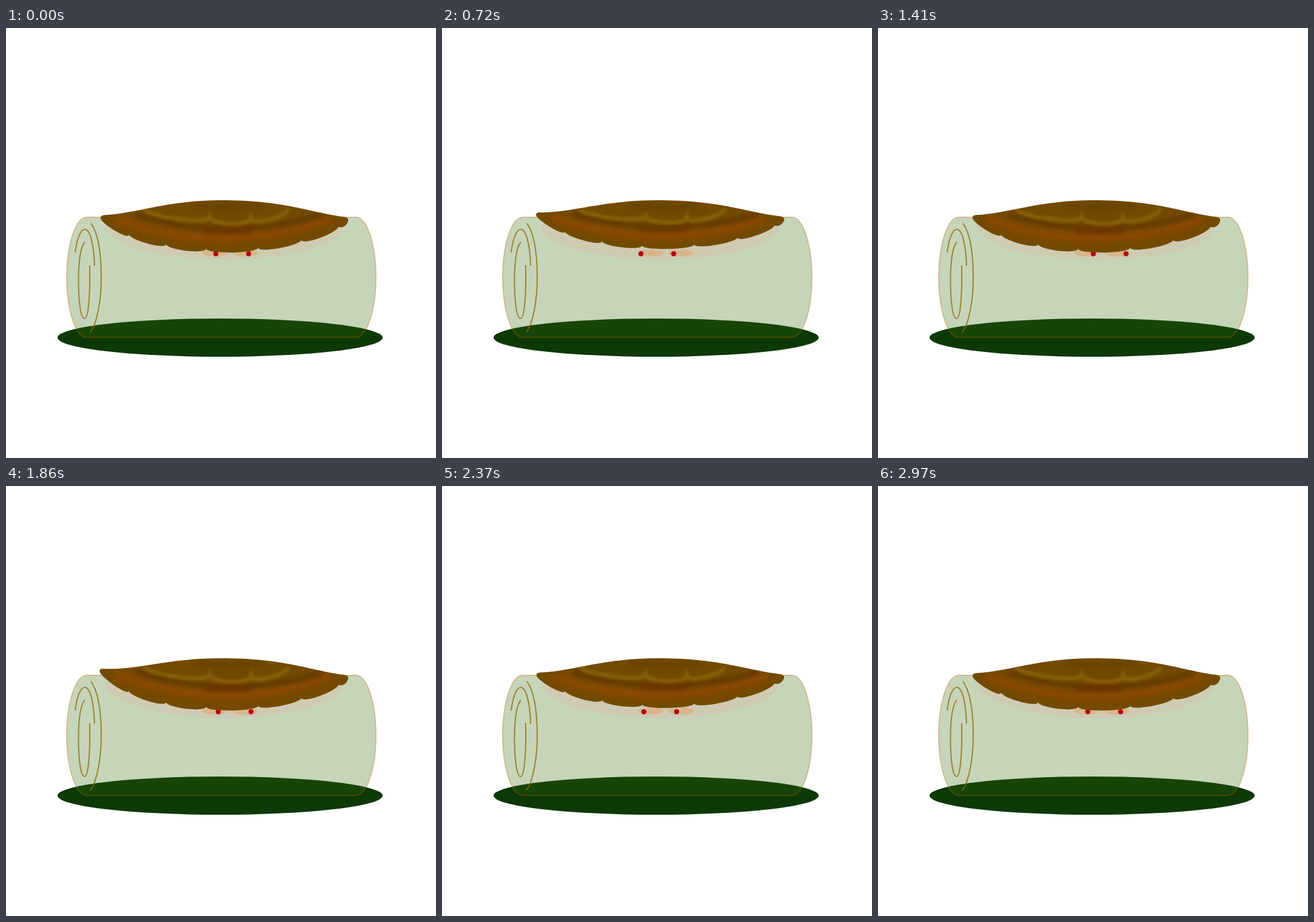
Recreate the animation shown at these times as an HTML page with a canvas. Size 709 px wide and 709 px high, loop 3 s.

```html
<!DOCTYPE html>
<html>
<head>
<meta charset="utf-8">
<style>
html, body { margin: 0; width: 100%; height: 100%; overflow: hidden; background: #fff; }
canvas { display: block; }
</style>
</head>
<body>
<canvas id="stage" width="709" height="709"></canvas>
<script>
const ctx = document.getElementById('stage').getContext('2d');
const LOOP = 3000, STEP = 30, { PI } = Math;

// Left pupil position at a few times
const GLANCES = [[0, 346], [720, 328], [1410, 355], [1860, 350], [2130, 330], [LOOP, 346]];
const NOTCHES = [548, 487, 416, 330, 264, 203];

const clamp = (v, lo, hi) => Math.min(hi, Math.max(lo, v));
const bump = (t, center, reach) =>
  Math.cos(clamp((t - center) / reach, -1, 1) * PI / 2) ** 2;
const rimY = x => 365 - 43 * Math.abs((x - 360) / 204) ** 2.2;

function glance(t) {
  const i = GLANCES.findIndex(key => key[0] > t);
  const [t0, x0] = GLANCES[i - 1], [t1, x1] = GLANCES[i];
  return x0 + (x1 - x0) * (1 - Math.cos(PI * (t - t0) / (t1 - t0))) / 2;
}

// Bends a resting point: both tips flap, the rim rises with the glance
function bender(t, pupil) {
  const leftLift = 4 * bump(t, 720, 350) + 8 * bump(t, 1900, 550);
  const rightLift = 9 * bump(t, 2640, 330);
  const rimLift = Math.max(0, (346 - pupil) / 3);
  return (x, y) => {
    const tip = leftLift * Math.max(0, (230 - x) / 74) +
      rightLift * Math.max(0, (x - 490) / 74);
    const depth = clamp((y - 300) / 72, 0, 1);
    return [x - 0.2 * tip, y - tip - rimLift * depth];
  };
}

function lobes(path, points, sag, bend) {
  for (let i = 1; i < points.length; i++) {
    const [x0, y0] = points[i - 1], [x1, y1] = points[i];
    const inset = (x1 - x0) * 0.04;
    path.bezierCurveTo(...bend(x0 + inset, y0 + sag),
      ...bend(x1 - inset, y1 + sag), ...bend(x1, y1));
  }
}

function capPath(bend) {
  const path = new Path2D();
  path.moveTo(...bend(162, 308.5));
  path.bezierCurveTo(...bend(215, 306), ...bend(265, 284), ...bend(355, 284));
  path.bezierCurveTo(...bend(460, 284), ...bend(500, 304), ...bend(558, 311.5));
  path.quadraticCurveTo(...bend(566, 313), ...bend(564, 319));
  path.quadraticCurveTo(...bend(559, 331), ...bend(548, 328));
  lobes(path, [...NOTCHES.map(x => [x, rimY(x)]), [156, 314]], 9, bend);
  path.quadraticCurveTo(...bend(155, 309), ...bend(162, 308.5));
  return path;
}

function shade(path, color, width, blur) {
  ctx.filter = `blur(${blur}px)`;
  ctx.strokeStyle = color;
  ctx.lineWidth = width;
  ctx.stroke(path);
}

function drawCap(bend) {
  const arc = (x0, x1, y, sag) => {
    const path = new Path2D();
    path.moveTo(...bend(x0, y));
    path.quadraticCurveTo(...bend((x0 + x1) / 2, y + 2 * sag), ...bend(x1, y));
    return path;
  };
  const ring = new Path2D();
  ring.moveTo(...bend(228, 298));
  lobes(ring, [[228, 298], [336, 312], [404, 314], [466, 298]], 13, bend);

  const cap = capPath(bend);
  ctx.fillStyle = '#734a00';
  ctx.fill(cap);
  ctx.save();
  ctx.clip(cap);
  shade(arc(180, 535, 315, 32), '#8c4900', 13, 4);
  shade(arc(215, 520, 308, 23), '#623700', 7, 3);
  shade(arc(325, 405, 333, 3), '#6b3300', 6, 3);
  shade(arc(310, 425, 292, 4), '#654200', 8, 4);
  shade(ring, '#8a6108', 6, 2);
  ctx.restore();
}

function oval(x, y, rx, ry, color, end = 2 * PI) {
  ctx.fillStyle = color;
  ctx.beginPath();
  ctx.ellipse(x, y, rx, ry, 0, 0, end);
  ctx.fill();
}

const log = new Path2D();
log.ellipse(577, 411, 33, 99, 0, -PI / 2, PI / 2);
log.ellipse(133, 411, 33, 99, 0, PI / 2, PI * 1.5);
log.closePath();

const spiral = new Path2D(
  'M140 322C153 340 157 375 157 412C157 450 150 487 139 502' +
  'M114 370C117 347 123 332 130 332C138 332 145 355 146 392' +
  'M130 353C123 360 119.5 385 119.5 415C119.5 450 123 479 129.5 479C136 479 139 440 138 391');

function drawLog() {
  oval(353, 510.5, 268, 31.5, '#0c3906');
  ctx.fillStyle = 'rgba(50,100,10,.28)';
  ctx.fill(log);
  ctx.lineWidth = 2;
  ctx.strokeStyle = 'rgba(185,105,0,.33)';
  ctx.stroke(log);
  ctx.strokeStyle = 'rgba(140,105,0,.75)';
  ctx.stroke(spiral);
}

function draw(now) {
  const t = Math.floor(now % LOOP / STEP) * STEP;
  const pupil = glance(t);
  ctx.clearRect(0, 0, 709, 709);
  drawLog();
  oval(360, 324, 196, 58, 'rgba(225,175,150,.25)', PI);
  for (const x of [344, 394]) oval(x, 371, 21, 5.5, '#d9b58a');
  for (const x of [0, 54]) oval(pupil + x, 372.3, 4.2, 4.2, '#b40014');
  drawCap(bender(t, pupil));
}

const start = performance.now();
function tick() {
  draw(performance.now() - start);
  requestAnimationFrame(tick);
}
tick();
</script>
</body>
</html>
```
